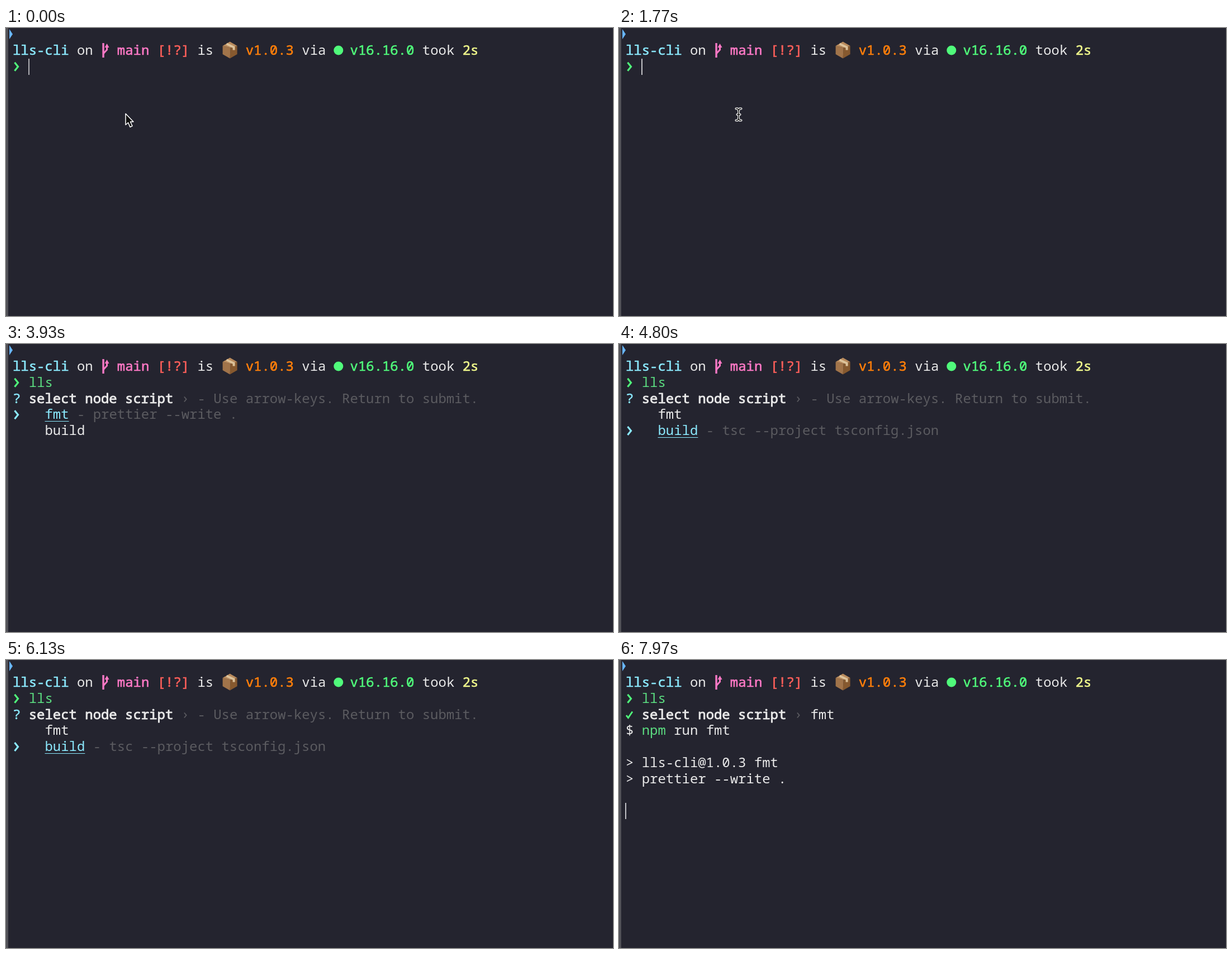
An HTML page with a canvas that plays this animation: 1086 px wide and 516 px high, repeating every 8000 ms.

```html
<!DOCTYPE html>
<html lang="en">
<head>
<meta charset="utf-8">
<title>Terminal session</title>
<style>
  html, body { margin: 0; width: 100%; height: 100%; overflow: hidden; background: #24242f; }
  canvas { display: block; }
</style>
</head>
<body>
<canvas id="stage" width="1086" height="516"></canvas>
<script>
const canvas = document.getElementById("stage");
const ctx = canvas.getContext("2d");

const LEFT = 12, CELL = 14.37, BASELINE = 48, LINE = 28.77;
const C = {
  bg: "#24242f", edge: "#515157", text: "#e9e9e9", dim: "#5b5b60", caret: "#c4c4c8",
  cyan: "#8be9fd", pink: "#ff79c6", red: "#ff5f5a", orange: "#ff7f0a",
  green: "#50fa7b", command: "#5bdc80", yellow: "#f1fa8c", blue: "#68b5fa"
};

// Session timing in ms
const LOOP = 8000, OVER_TEXT = 400, ENTER = 3460, MENU = 3760, OUTPUT = 7720;
const FIRST_KEY = 2400, KEY_GAP = 140;
const FIRST_MOVE = 4520, MOVE_GAP = 680, MOVES = 4;
const SUBMIT = FIRST_MOVE + MOVES * MOVE_GAP;

const COMMAND = "lls";
const OPTIONS = [
  { name: "fmt", script: "prettier --write ." },
  { name: "build", script: "tsc --project tsconfig.json" }
];

const colX = col => LEFT + col * CELL;
const rowY = row => BASELINE + row * LINE;

// Number of evenly spaced events that have happened by time t
const countSince = (t, first, gap, max) =>
  Math.max(0, Math.min(max, Math.floor((t - first) / gap) + 1));

function say(text, col, row, color = C.text, weight = 0) {
  ctx.fillStyle = ctx.strokeStyle = color;
  ctx.fillText(text, colX(col), rowY(row));
  if (weight) {
    ctx.lineWidth = weight;
    ctx.lineJoin = "round";
    ctx.strokeText(text, colX(col), rowY(row));
  }
}

const strong = (text, col, row, color) => say(text, col, row, color, 0.9);

function trace(points) {
  ctx.beginPath();
  points.forEach(([x, y]) => ctx.lineTo(x, y));
}

function fill(color, ...points) {
  trace(points);
  ctx.fillStyle = color;
  ctx.fill();
}

function stroke(color, width, ...points) {
  trace(points);
  ctx.strokeStyle = color;
  ctx.lineWidth = width;
  ctx.lineJoin = "miter";
  ctx.stroke();
}

function chevron(row, color) {
  const x = LEFT + 3.5, y = rowY(row) - 7.5;
  stroke(color, 3.2, [x, y - 7.5], [x + 6, y], [x, y + 7.5]);
}

function branchIcon(x, y) {
  const stem = x + 4, side = x + 10.5;
  stroke(C.pink, 3.4, [stem, y - 13], [stem, y + 13]);
  stroke(C.pink, 3, [side, y - 8], [side, y - 1], [stem, y + 6]);
  fill(C.pink, [side - 4, y - 5], [side, y - 12], [side + 4, y - 5]);
}

// Isometric box: three faces of a hexagon meeting at one raised corner
function parcel(x, y) {
  const cx = x + 15, cy = y - 0.5, meet = [cx + 1, cy - 4];
  const corner = k => [
    cx + 15 * Math.cos((k * 60 - 30) * Math.PI / 180),
    cy + 15 * Math.sin((k * 60 - 30) * Math.PI / 180)
  ];
  ["#86592f", "#a1744a", "#b98b5d"].forEach((color, i) =>
    fill(color, meet, corner(2 * i), corner(2 * i + 1), corner(2 * i + 2)));
  stroke("#dcc29a", 4, [cx - 6, cy - 11], [cx + 7, cy - 5], [cx + 7, cy]);
}

function dotIcon(x, y) {
  ctx.fillStyle = C.green;
  ctx.beginPath();
  ctx.arc(x + 8, y, 8.5, 0, Math.PI * 2);
  ctx.fill();
}

const PROMPT = [
  { text: "lls-cli", color: C.cyan }, { text: "on" },
  { icon: branchIcon, width: 1 }, { text: "main", color: C.pink },
  { text: "[!?]", color: C.red }, { text: "is" },
  { icon: parcel, width: 2 }, { text: "v1.0.3", color: C.orange }, { text: "via" },
  { icon: dotIcon, width: 1 }, { text: "v16.16.0", color: C.green },
  { text: "took" }, { text: "2s", color: C.yellow }
];

function prompt() {
  let col = 0;
  for (const { text, color, icon, width } of PROMPT) {
    if (icon) icon(colX(col), rowY(0) - 8);
    else say(text, col, 0, color, color ? 0.6 : 0);
    col += (width || text.length) + 1;
  }
  chevron(1, C.green);
}

function question() {
  strong("select node script", 2, 2);
  say("›", 21, 2, C.dim);
}

function menu(t) {
  const selected = countSince(t, FIRST_MOVE, MOVE_GAP, MOVES) % OPTIONS.length;
  say("?", 0, 2, C.cyan, 0.5);
  question();
  say("- Use arrow-keys. Return to submit.", 23, 2, C.dim);
  OPTIONS.forEach(({ name, script }, i) => {
    const row = 3 + i, active = i === selected;
    say(name, 4, row, active ? C.cyan : C.text);
    if (!active) return;
    ctx.fillRect(colX(4), Math.round(rowY(row) + 4), name.length * CELL, 1);
    chevron(row, C.cyan);
    say("- " + script, 5 + name.length, row, C.dim);
  });
}

function result(t) {
  const { name, script } = OPTIONS[0], y = rowY(2) - 7;
  stroke(C.green, 2.8, [LEFT + 1, y + 0.5], [LEFT + 4.5, y + 5], [LEFT + 12, y - 6]);
  question();
  say(name, 23, 2);
  say("$", 0, 3);
  say("npm", 2, 3, C.command);
  say("run " + name, 6, 3);
  if (t < OUTPUT) return;
  say("> lls-cli@1.0.3 " + name, 0, 5);
  say("> " + script, 0, 6);
}

function caret(t, col, row) {
  const glow = 0.6 + 0.65 * Math.cos((t - 820) / 1000 * Math.PI * 2);
  ctx.globalAlpha = Math.max(0, Math.min(1, glow));
  ctx.fillStyle = C.caret;
  ctx.fillRect(Math.round(colX(col)) - 1, Math.round(rowY(row) - 22), 2, 29);
  ctx.globalAlpha = 1;
}

function arrowPointer(x, y) {
  ctx.lineJoin = "round";
  fill("#111", [x, y], [x, y + 20], [x + 4.6, y + 16], [x + 8, y + 24],
    [x + 12, y + 22], [x + 8.5, y + 14.5], [x + 14, y + 14.5]);
  ctx.closePath();
  ctx.strokeStyle = "#fff";
  ctx.lineWidth = 1.5;
  ctx.stroke();
}

function textPointer(x, y) {
  ctx.lineCap = "round";
  for (const [color, width] of [["#fff", 4], ["#111", 1.6]]) {
    stroke(color, width, [x, y - 8], [x, y + 8]);
    stroke(color, width, [x - 2.5, y], [x + 2.5, y]);
    for (const end of [-1, 1])
      for (const side of [-1, 1])
        stroke(color, width, [x, y + end * 8], [x + side * 2, y + end * 10.5], [x + side * 4.5, y + end * 10.5]);
  }
  ctx.lineCap = "butt";
}

function draw(t) {
  ctx.fillStyle = C.bg;
  ctx.fillRect(0, 0, canvas.width, canvas.height);
  ctx.fillStyle = C.edge;
  ctx.fillRect(0, 0, 4, canvas.height);
  fill(C.blue, [6, 2], [12, 11], [6, 20]);

  ctx.font = '23.95px "Noto Sans Mono", "DejaVu Sans Mono", monospace';
  prompt();
  const typed = countSince(t, FIRST_KEY, KEY_GAP, COMMAND.length);
  say(COMMAND.slice(0, typed), 2, 1, C.command);

  if (t < ENTER) caret(t, 2 + typed, 1);
  else if (t < MENU) caret(t, 0, 2);
  else if (t < SUBMIT) menu(t);
  else {
    result(t);
    caret(t, 0, t < OUTPUT ? 4 : 8);
  }

  if (t < OVER_TEXT) arrowPointer(214, 153.5);
  else if (t < FIRST_KEY) textPointer(214, 155);
}

const start = performance.now();
function tick() {
  draw((performance.now() - start) % LOOP);
  requestAnimationFrame(tick);
}
tick();
</script>
</body>
</html>
```
